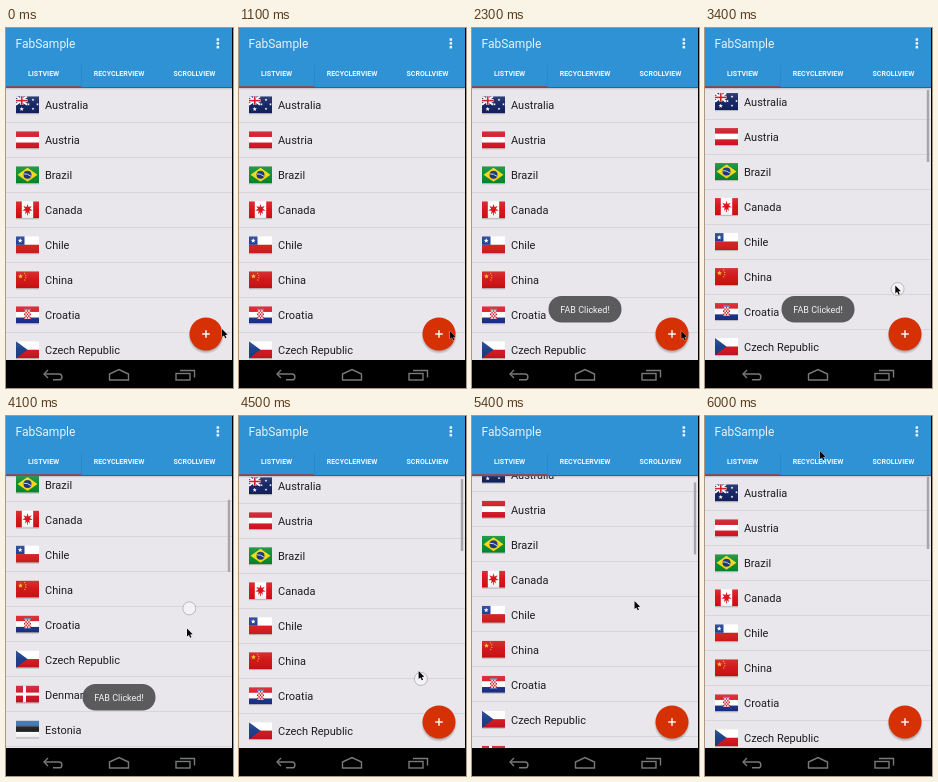
An HTML page with a canvas for the animation above (6.1 s loop, 227 by 360 pixels).

```html
<!DOCTYPE html>
<html lang="en">
<head>
<meta charset="utf-8">
<title>List with floating button</title>
<style>
html, body { margin: 0; width: 100%; height: 100%; overflow: hidden; background: #000; }
canvas { display: block; width: 227px; height: 360px; }
</style>
</head>
<body>
<canvas id="stage" width="227" height="360"></canvas>
<script>
const ctx = document.getElementById('stage').getContext('2d');
const LOOP = 6100, STEP = 100;
const W = 226, LIST_TOP = 60, NAV_TOP = 332, ROW = 35;
const FLAG_W = 23, FLAG_H = 17;
const DRAG_START = 3300, DRAG_END = 5300;

// Pointer stops: time, x, y
const pointerStops = [[0, 216, 301], [1100, 211, 303], [2700, 209, 303], [3300, 191, 265],
  [3850, 182, 170], [4350, 180, 255], [4700, 179, 255], [5150, 176, 198], [5300, 176, 245],
  [5600, 122, 5], [6000, 115, 35]];

const clamp = x => Math.max(0, Math.min(1, x));
const mix = (a, b, p) => a + (b - a) * p;
const ease = p => (1 - Math.cos(Math.PI * clamp(p))) / 2;
const swing = (t, start, length) => Math.sin(Math.PI * clamp((t - start) / length)) ** 2;

// Two drags up and back down
const scrollAt = t => 87 * swing(t, 3320, 1300) + 45 * swing(t, 4700, 900);

const slide = (t, hideAt, showAt) => 46 * (ease((t - hideAt) / 200) - ease((t - showAt) / 200));
const fabOffset = t => slide(t, 3450, 4150) + slide(t, 4945, 5200);

function pointerAt(t) {
  const next = Math.max(1, pointerStops.findIndex(stop => stop[0] >= t));
  const [t0, x0, y0] = pointerStops[next - 1], [t1, x1, y1] = pointerStops[next];
  const p = ease((t - t0) / (t1 - t0));
  return [mix(x0, x1, p), mix(y0, y1, p)];
}

function rect(x, y, w, h, color) {
  ctx.fillStyle = color;
  ctx.fillRect(x, y, w, h);
}

function disc(x, y, r, color) {
  ctx.fillStyle = color;
  ctx.beginPath();
  ctx.arc(x, y, r, 0, 7);
  ctx.fill();
}

function poly(points, color) {
  ctx.fillStyle = color;
  ctx.beginPath();
  points.forEach(([x, y]) => ctx.lineTo(x, y));
  ctx.closePath();
  ctx.fill();
}

function line(points, color, width) {
  ctx.strokeStyle = color;
  ctx.lineWidth = width;
  ctx.beginPath();
  points.forEach(([x, y]) => ctx.lineTo(x, y));
  ctx.stroke();
}

function text(s, x, y, font, color, align = 'left') {
  ctx.font = font + ' Roboto, sans-serif';
  ctx.fillStyle = color;
  ctx.textAlign = align;
  ctx.fillText(s, x, y);
}

function gradient(y0, y1, ...colors) {
  const g = ctx.createLinearGradient(0, y0, 0, y1);
  colors.forEach((c, i) => g.addColorStop(i / (colors.length - 1), c));
  return g;
}

function star(x, y, r, color, tips = 5) {
  poly(Array.from({ length: 2 * tips }, (_, i) => {
    const a = i * Math.PI / tips, d = i % 2 ? r * .45 : r;
    return [x + d * Math.sin(a), y - d * Math.cos(a)];
  }), color);
}

// Four small stars spread along an arc
function starArc(x, y, radius, from, turn, r, color) {
  for (let i = 0; i < 4; i++) {
    const a = from + i * turn;
    star(x + radius * Math.cos(a), y + radius * Math.sin(a), r, color);
  }
}

function bands(...colors) {
  const h = FLAG_H / colors.length;
  colors.forEach((c, i) => rect(0, i * h, FLAG_W, h, c));
}

const flags = {
  'Australia'() {
    bands('#10205f');
    line([[0, 0], [11, 8.5]], '#fff', 2);
    line([[11, 0], [0, 8.5]], '#fff', 2);
    rect(0, 2.7, 11.5, 3.2, '#fff');
    rect(4.2, 0, 3.2, 8.5, '#fff');
    rect(0, 3.5, 11.5, 1.6, '#cc0c1c');
    rect(5, 0, 1.6, 8.5, '#cc0c1c');
    star(5.7, 12.8, 2.2, '#fff');
    starArc(17, 8, 4.5, 0, Math.PI / 2, 1.4, '#fff');
  },
  'Austria'() { bands('#cc1020', '#fff', '#d81424'); },
  'Brazil'() {
    bands('#068a2c');
    poly([[11.5, 1.5], [21.5, 8.5], [11.5, 15.5], [1.5, 8.5]], '#f8d810');
    disc(11.5, 8.5, 4, '#143078');
    line([[7.8, 7.6], [11.5, 8], [15, 10]], '#dfe8f4', .9);
  },
  'Canada'() {
    bands('#fff');
    rect(0, 0, 5.8, FLAG_H, '#d80c14');
    rect(17.2, 0, 5.8, FLAG_H, '#d80c14');
    star(11.5, 8, 5.4, '#d80c14', 7);
    rect(11.1, 10, .8, 4, '#d80c14');
  },
  'Chile'() {
    bands('#fff', '#d41c1c');
    rect(0, 0, 8.5, 8.5, '#183890');
    star(4.2, 4.4, 2.4, '#fff');
  },
  'China'() {
    bands('#cf1012');
    star(4.5, 5, 2.5, '#f4c81c');
    starArc(4.5, 5.5, 5.4, -.7, .45, .9, '#f4c81c');
  },
  'Croatia'() {
    bands('#d81420', '#fff', '#182f88');
    rect(8, 3.6, 7, 9, '#fff');
    for (let i = 0; i < 25; i += 2)
      rect(8 + i % 5 * 1.4, 3.8 + Math.floor(i / 5) * 1.7, 1.4, 1.7, '#d01420');
    rect(8, 2.5, 7, 1.3, '#4b86c4');
  },
  'Czech Republic'() {
    bands('#fff', '#d0121c');
    poly([[0, 0], [11.5, 8.5], [0, 17]], '#163a86');
  },
  'Denmark'() {
    bands('#cc1024');
    rect(7, 0, 3, FLAG_H, '#fff');
    rect(0, 7, FLAG_W, 3, '#fff');
  },
  'Estonia'() { bands('#2c6cb8', '#1c1c1c', '#fff'); }
};

function drawFlag(x, y, paint) {
  rect(x, y + 1, FLAG_W, FLAG_H, 'rgba(0,0,0,.2)');
  ctx.save();
  ctx.translate(x, y);
  ctx.beginPath();
  ctx.rect(0, 0, FLAG_W, FLAG_H);
  ctx.clip();
  paint();
  rect(0, 0, FLAG_W, FLAG_H,
    gradient(0, FLAG_H, 'rgba(255,255,255,.14)', 'rgba(255,255,255,.03)', 'rgba(0,0,0,.08)'));
  ctx.restore();
}

function drawList(scroll, showBar) {
  rect(0, LIST_TOP, W, NAV_TOP - LIST_TOP, '#e9e7ec');
  Object.entries(flags).forEach(([name, paint], i) => {
    const y = LIST_TOP + i * ROW - scroll;
    drawFlag(10, y + 8.3, paint);
    text(name, 39, y + 21.3, '11px', '#1d1d20');
    rect(0, Math.round(y + ROW - 1), W, 1, '#d7d5da');
  });
  if (showBar) rect(221.8, 61 + scroll * .29, 2.4, 72, '#a6a5a9');
}

function drawHeader() {
  rect(0, 0, W, LIST_TOP - 1, '#2f92d4');
  rect(0, 58, 75.5, 1, '#7d5560');
  rect(0, 59, W, 3, gradient(59, 62, '#4d83a8', 'rgba(110,120,130,.25)', 'rgba(110,120,130,0)'));
  text('FabSample', 9.5, 19.8, '12px', '#e6f2fa');
  for (let i = 0; i < 3; i++) rect(210.6, 10.3 + i * 3.8, 2.5, 2.5, '#eef6fb');
  ['LISTVIEW', 'RECYCLERVIEW', 'SCROLLVIEW'].forEach((label, i) =>
    text(label, 37.6 + i * 75.4, 47.8, 'bold 7px', '#f0f7fc', 'center'));
  rect(75, 37, .7, 21, 'rgba(20,80,130,.2)');
}

function drawFab(y) {
  const glow = ctx.createRadialGradient(200, y + 2, 14, 200, y + 2, 18);
  glow.addColorStop(0, 'rgba(0,0,0,.35)');
  glow.addColorStop(1, 'rgba(0,0,0,0)');
  disc(200, y + 2, 18, glow);
  disc(200, y, 16.5, '#d63104');
  rect(196.2, y - .7, 7.6, 1.4, '#fff');
  rect(199.3, y - 3.8, 1.4, 7.6, '#fff');
}

function drawToast(alpha) {
  ctx.globalAlpha = alpha;
  ctx.fillStyle = 'rgba(86,86,88,.96)';
  ctx.beginPath();
  ctx.roundRect(76.5, 268, 73, 26.5, 13);
  ctx.fill();
  text('FAB Clicked!', 113, 285.3, 'condensed 9px', '#f4f4f4', 'center');
  ctx.globalAlpha = 1;
}

function drawNav() {
  const gray = '#77797a';
  rect(0, NAV_TOP, W, 28, '#000');
  ctx.strokeStyle = gray;
  ctx.lineWidth = 1.4;
  ctx.beginPath();
  ctx.moveTo(38, 346);
  ctx.lineTo(53, 346);
  ctx.arc(53, 348.9, 2.9, -Math.PI / 2, Math.PI / 2);
  ctx.lineTo(47, 351.8);
  ctx.stroke();
  line([[42, 342], [38, 346], [42, 350]], gray, 1.4);
  line([[103.5, 352], [103.5, 346], [113, 341.5], [122.5, 346], [122.5, 352], [103, 352]], gray, 1.4);
  ctx.strokeRect(170, 345.5, 14, 6.5);
  line([[174, 342.5], [188.5, 342.5], [188.5, 349.5]], gray, 1.4);
}

function drawTouch(x, y) {
  disc(x, y, 6.5, 'rgba(245,245,247,.85)');
  ctx.strokeStyle = 'rgba(130,130,135,.7)';
  ctx.lineWidth = .7;
  ctx.stroke();
}

function drawPointer(x, y) {
  const shape = [[0, 0], [0, 8], [1.9, 6.4], [3.2, 9.3], [4.5, 8.7], [3.2, 5.9], [5.7, 5.7], [0, 0]]
    .map(([dx, dy]) => [x + dx, y + dy]);
  line(shape, 'rgba(255,255,255,.6)', 1);
  poly(shape, '#080808');
}

function draw(t) {
  const [x, y] = pointerAt(t);
  rect(0, 0, 227, 360, '#000');
  drawList(scrollAt(t), t >= DRAG_START);
  drawFab(306 + fabOffset(t));
  const toast = Math.min(clamp((t - 2050) / 200), clamp((4450 - t) / 200));
  if (toast > 0) drawToast(toast);
  drawHeader();
  drawNav();
  if (t >= DRAG_START && t <= DRAG_END) drawTouch(x + 2.3, 267 - scrollAt(t + 30));
  drawPointer(x, y);
}

function tick(now) {
  draw(Math.floor(now % LOOP / STEP) * STEP);
  requestAnimationFrame(tick);
}
requestAnimationFrame(tick);
</script>
</body>
</html>
```
